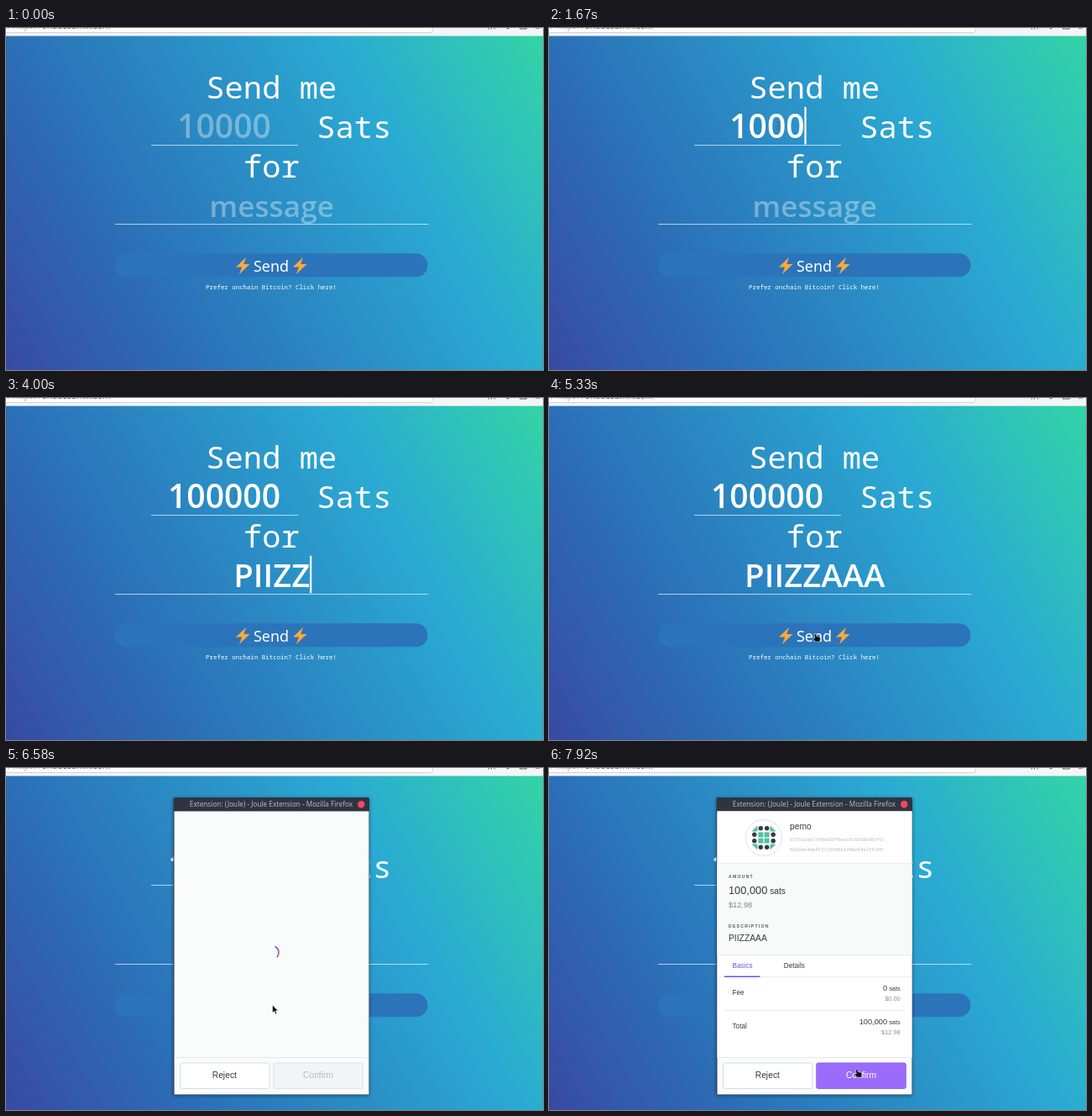
Animation, 640 px wide and 407 px high, one loop 8 s. Source, as an HTML page:

```html
<!DOCTYPE html>
<html lang="en">
<head>
<meta charset="utf-8">
<title>Send me Sats</title>
<style>
  html, body { margin: 0; width: 100%; height: 100%; overflow: hidden; background: #2a8ec6; }
  svg { display: block; width: 100vw; height: 100vh; }
  text { white-space: pre; }
  .mono { font: 250 37.2px "Noto Sans Mono", monospace; fill: #fff; }
  .field { font: 640 38.4px "Open Sans", sans-serif; fill: #fff; text-anchor: middle; }
  .hint { fill-opacity: .36; }
  .mid { text-anchor: middle; }
  .end { text-anchor: end; }
  #popup { font: 10.3px "Liberation Sans", Arial, sans-serif; fill: #383c40; }
  #popup .label { font-size: 5.2px; font-weight: bold; letter-spacing: 1.2px; fill: #55595d; }
  #popup .small { font-size: 8.2px; }
  #popup .sub { font-size: 7.4px; fill: #8b8f93; }
  #popup .key { font: 5.6px "Liberation Mono", monospace; fill: #b4b7ba; }
</style>
</head>
<body>
<svg viewBox="0 0 640 407" preserveAspectRatio="none">
  <defs>
    <linearGradient id="sky" gradientUnits="userSpaceOnUse" x1="-6" y1="396" x2="646" y2="20">
      <stop offset="0" stop-color="#384aa3"/>
      <stop offset=".27" stop-color="#2b70b7"/>
      <stop offset=".71" stop-color="#2aaad3"/>
      <stop offset="1" stop-color="#33d4a6"/>
    </linearGradient>
    <linearGradient id="arc" gradientUnits="userSpaceOnUse" x1="0" y1="-8" x2="0" y2="7">
      <stop offset=".25" stop-color="#4b4bea"/>
      <stop offset=".8" stop-color="#e23c3c"/>
    </linearGradient>
    <filter id="shadow" x="-10%" y="-10%" width="120%" height="120%">
      <feDropShadow dx="0" dy="1" stdDeviation="2.2" flood-color="#0a1c30" flood-opacity=".55"/>
    </filter>
    <path id="bolt" fill="#fba93b" d="M12 0 0 11.5H7.200L4 20 16.500 8H9.300Z"/>
  </defs>

  <!-- Page -->
  <rect y="9" width="640" height="398" fill="url(#sky)"/>
  <text class="mono mid" x="316.300" y="84">Send me</text>
  <text class="mono" x="370.200" y="131">Sats</text>
  <text class="mono mid" x="316.300" y="178">for</text>
  <text id="amount" class="field" x="260" y="131"></text>
  <text id="message" class="field" x="316.800" y="225"></text>
  <path d="M173 139.500H348M130 233.500H503.500" stroke="#fff" stroke-opacity=".65"/>
  <rect id="caret" width="2.200" height="44.500" fill="#fff"/>
  <rect x="130" y="268.300" width="372.500" height="28" rx="14" fill="#2b74ba"/>
  <use href="#bolt" x="274" y="273"/>
  <use href="#bolt" x="342" y="273"/>
  <text class="mid" x="316" y="289.500" font-size="18" font-family="Noto Sans, sans-serif" fill="#fff">Send</text>
  <text class="mid" x="316" y="310.500" font-size="7.430" font-family="Noto Sans Mono, monospace" fill="#fff">Prefer onchain Bitcoin? Click here!</text>

  <!-- Browser toolbar -->
  <rect width="640" height="9.500" fill="#f4f5f6"/>
  <path d="M0 0H508V5.500H0Z" fill="#fff"/>
  <path d="M0 5.500H506Q508.500 5.500 508.500 0" fill="none" stroke="#d0d2d4"/>
  <text x="2" y=".8" font-size="10" font-family="Noto Sans, sans-serif" fill="#55595d"><tspan fill="#a0a3a6">/ https://</tspan>orladesumik.com</text>
  <path d="M575.500 0V1.500M578.500 0V1.500M580.500-1 583 1.500M594.500-1.500 598 1 601.500-1.500M612.500-1V1H620.500V-1" fill="none" stroke="#55595d"/>
  <path d="M631 0H636" stroke="#d8504c" stroke-width="1.500"/>

  <!-- Payment window -->
  <g id="popup">
    <rect x="199.500" y="35" width="233.500" height="354" rx="2" fill="#2f3441" filter="url(#shadow)"/>
    <text class="mid" x="316" y="46.300" font-family="Noto Sans, sans-serif" font-size="8.200" style="fill:#b3b8c2">Extension: (Joule) - Joule Extension - Mozilla Firefox</text>
    <circle cx="423.300" cy="43.300" r="4.200" fill="#f2495a"/>
    <rect x="200.500" y="51.500" width="232" height="337" fill="#fafcfb"/>
    <g id="spinner">
      <path d="M3.400-7.200A8 8 0 0 1 5.700 5.700" fill="none" stroke="url(#arc)" stroke-width="1.500"/>
    </g>

    <g id="details">
      <rect x="200.500" y="51.500" width="232" height="293" fill="#fff"/>
      <path d="M200.500 113H432.500V222H200.500Z" fill="#f8faf9"/>
      <path d="M200.500 113.500H432.500M200.500 222.500H432.500M200.500 248.500H432.500M209 288.500H425" stroke="#ebedee"/>
      <circle cx="256" cy="83" r="21.500" fill="#fff" stroke="#dfe1e3"/>
      <g id="avatar"></g>
      <text x="287" y="72.500">pemo</text>
      <text class="key" x="287" y="87">02c51e9a7740bd38f6ea15c92d804b7f3</text>
      <text class="key" x="287" y="99">6d19ab40e8f27c5350b1d98e64a72fc05</text>
      <text class="label" x="214" y="131">AMOUNT</text>
      <text x="214" y="150"><tspan font-size="12.800">100,000</tspan> sats</text>
      <text x="214" y="165.500" font-size="9.200" style="fill:#7d8185">$12.98</text>
      <text class="label" x="214" y="189.500">DESCRIPTION</text>
      <text x="214" y="206">PIIZZAAA</text>
      <text class="small" x="218.500" y="238.300" style="fill:#7a4df3">Basics</text>
      <text class="small" x="279.800" y="238.300">Details</text>
      <path d="M209 248.300H251.500" stroke="#7a4df3" stroke-width="1.500"/>
      <text class="small" x="218.500" y="270">Fee</text>
      <text class="end" x="418.700" y="265" font-size="9.250">0<tspan font-size="7.400"> sats</tspan></text>
      <text class="sub end" x="418.700" y="277">$0.00</text>
      <text class="small" x="218.500" y="310">Total</text>
      <text class="end" x="418.700" y="304.500" font-size="9.250">100,000<tspan font-size="7.400"> sats</tspan></text>
      <text class="sub end" x="418.700" y="316.500">$12.98</text>
    </g>

    <path d="M200.500 344.500H432.500" stroke="#e6e8e9"/>
    <rect x="207.500" y="351" width="106.500" height="30.500" rx="2" fill="#fff" stroke="#d9dbdd"/>
    <text class="mid" x="260.300" y="369">Reject</text>
    <rect id="confirm" x="318.800" y="351" width="106.500" height="30.500" rx="2"/>
    <text id="confirmText" class="mid" x="372" y="369">Confirm</text>
  </g>

  <!-- Mouse pointer shapes -->
  <g id="pointer">
    <path id="arrow" d="M0 0V9.500L2.200 7.500 3.700 11 5.300 10.300 3.800 7H6.800Z" fill="#111" stroke="#fff" stroke-width=".6"/>
    <path id="beam" d="M-2-4.500H2M0-4.500V4.500M-2 4.500H2" fill="none" stroke="#6d625e"/>
    <path id="hand" d="M-1.500-.8Q0-2.300 1-.5L1.300 1.500 5 2.400Q6.200 2.900 6 4.200L5.300 8.200H0L-3 4.200Q-2.800 2.800-.8 4Z" fill="#111" stroke="#fff" stroke-width=".5"/>
  </g>
</svg>
<script>
const $ = id => document.getElementById(id);
const LOOP = 8000;
const MESSAGE_FOCUS = 2750, POPUP_OPEN = 5660, SPINNER_START = 5920, LOADED = 6830;

const amount = { el: $('amount'), text: '100000', size: 39.2, hint: '10000', hintSize: 39.2,
  keys: [1080, 1250, 1420, 1580, 1830, 2000], center: 260, top: 94 };
const message = { el: $('message'), text: 'PIIZZAAA', size: 38.4, hint: 'message', hintSize: 35.2,
  keys: [3380, 3520, 3640, 3780, 3920, 4150, 4330, 4500], center: 316.8, top: 187.7 };

// Pointer path: [start, end, from, to]
const moves = [
  [350, 800, [645, 200], [273, 116]],
  [4900, 5230, [273, 116], [317.5, 282]],
  [7250, 7750, [317.5, 282], [367, 360]]
];

const dot = (x, y) => `<circle cx="${x}" cy="${y}" r="2.700" fill="#333b41"/>`;
const square = (x, y) => `<rect x="${x - 3}" y="${y - 3}" width="6" height="6" fill="#52c1a0"/>`;
let avatar = '';
for (const sx of [-1, 1]) for (const sy of [-1, 1]) {
  const x = n => 256 + sx * n, y = n => 83 + sy * n;
  avatar += dot(x(3.7), y(11.3)) + dot(x(11.2), y(3.8)) + square(x(3.6), y(3.6)) +
    `<path d="M${x(7.5)} ${y(14.5)}L${x(14.5)} ${y(7.5)}H${x(7.5)}Z" fill="#52c1a0"/>`;
}
$('avatar').innerHTML = avatar;

const show = (id, on) => $(id).setAttribute('visibility', on ? 'inherit' : 'hidden');
const setAttrs = (id, attrs) => {
  for (const name in attrs) $(id).setAttribute(name, attrs[name]);
};

function drawField(field, t) {
  const typed = field.text.slice(0, field.keys.filter(k => k <= t).length);
  field.el.textContent = typed || field.hint;
  field.el.classList.toggle('hint', !typed);
  field.el.style.fontSize = (typed ? field.size : field.hintSize) + 'px';
  field.width = typed ? field.el.getComputedTextLength() : 0;
}

function drawCaret(t) {
  const field = t < MESSAGE_FOCUS ? amount : message;
  const focusTime = field === amount ? 870 : MESSAGE_FOCUS;
  const lastInput = Math.max(focusTime, ...field.keys.filter(k => k <= t));
  const on = t >= focusTime && t < 5200 && (t - lastInput) % 1000 < 500;
  show('caret', on);
  setAttrs('caret', { x: field.center + field.width / 2 - .3, y: field.top });
}

function drawPointer(t) {
  let [x, y] = moves[0][2];
  for (const [start, end, from, to] of moves) {
    if (t < start) break;
    const p = Math.min(1, (t - start) / (end - start));
    const ease = p * p * (3 - 2 * p);
    x = from[0] + (to[0] - from[0]) * ease;
    y = from[1] + (to[1] - from[1]) * ease;
  }
  const open = t >= POPUP_OPEN;
  const overField = !open && x > 173 && x < 348 && y > 94 && y < 140;
  const overButton = open ? t >= LOADED && y > 351 : x > 130 && x < 503 && y > 268 && y < 296;
  $('pointer').setAttribute('transform', `translate(${x} ${y})`);
  show('beam', overField);
  show('hand', overButton);
  show('arrow', !overField && !overButton);
}

function drawPopup(t) {
  const loaded = t >= LOADED;
  show('popup', t >= POPUP_OPEN);
  show('spinner', t >= SPINNER_START && !loaded);
  show('details', loaded);
  $('spinner').setAttribute('transform', `translate(317 219.5) rotate(${(t - 6580) * .45})`);
  setAttrs('confirm', { fill: loaded ? '#9b6cfb' : '#f2f4f5', stroke: loaded ? '#9263f4' : '#dfe1e3' });
  $('confirmText').setAttribute('fill', loaded ? '#fff' : '#b9bcc0');
}

function frame(now) {
  const t = now % LOOP;
  drawField(amount, t);
  drawField(message, t);
  drawCaret(t);
  drawPopup(t);
  drawPointer(t);
  requestAnimationFrame(frame);
}
frame(0);
</script>
</body>
</html>
```
